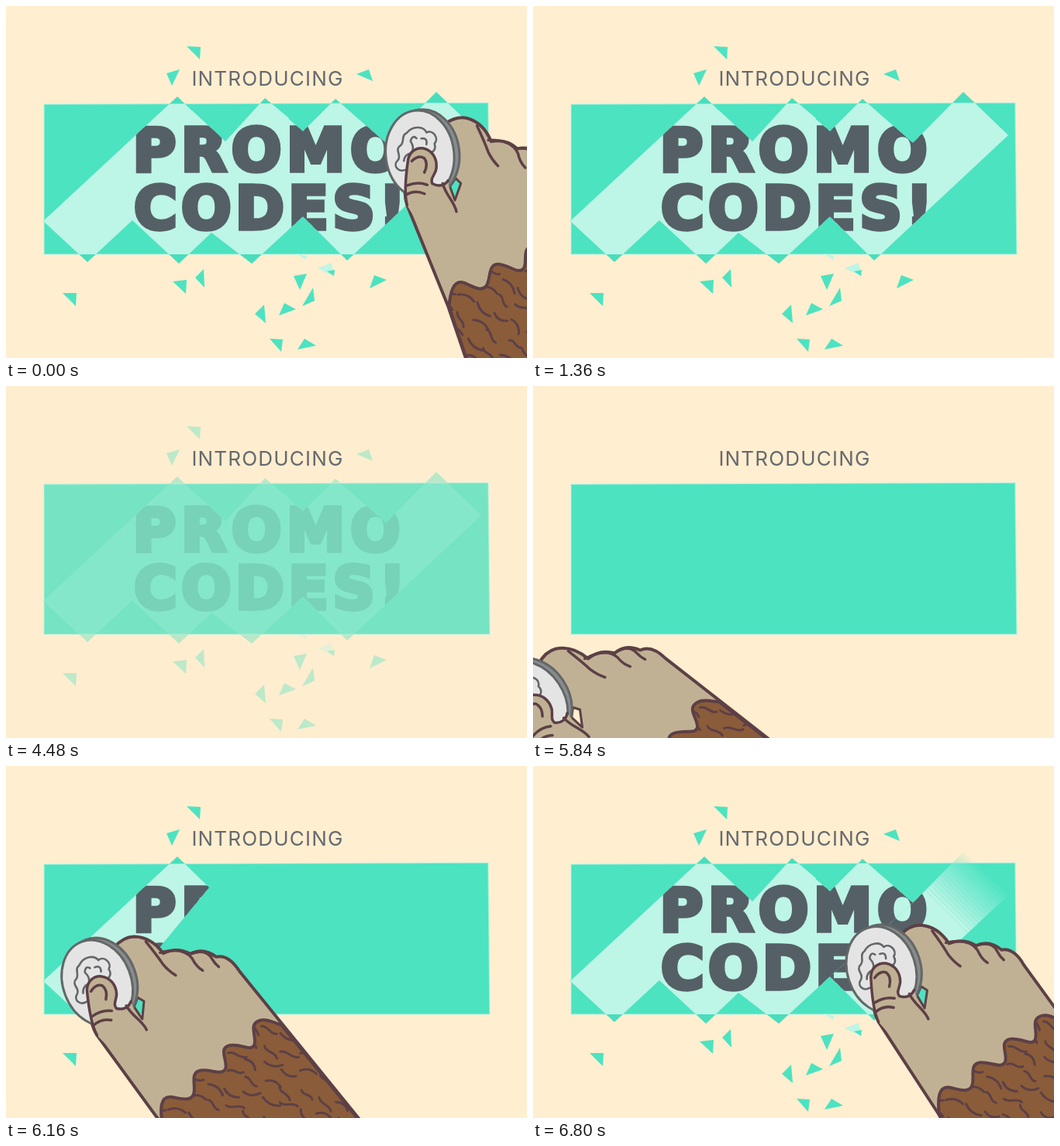
Recreate the animation shown at these times as an HTML page with a canvas. Size 672x455 px, loop 6.88 s.

```html
<!DOCTYPE html>
<html lang="en">
<head>
<meta charset="utf-8">
<title>Promo codes</title>
<style>
html, body { margin: 0; width: 100%; height: 100%; overflow: hidden; background: #ffeecf; }
canvas { display: block; }
</style>
</head>
<body>
<canvas id="stage" width="672" height="455"></canvas>
<script>
const ctx = document.getElementById('stage').getContext('2d');
const LOOP = 6880, STEP = 80;
const BG = '#ffeecf', TEAL = '#4ce3c1', PALE = '#bdf5e6', INK = '#555f66';
const LINE = '#5d4046', SKIN = '#c1b194', FUR = '#8a5c39', RIM = '#636768';

const stage = new Path2D('M0 0H672V455H0Z');
const card = new Path2D('M49 127L622 125L624 321L49 321Z');

// Scratched bands: outline, start time, range of x - y they sweep, loose flakes
const bands = [
  { shape: 'M48 278L221 117L262 157L163 277L105 331Z',
    start: 5920, from: -232, to: 110,
    flakes: 'M233 52L251 53L250 69ZM207 87L224 82L214 103ZM73 371L91 371L90 388Z' },
  { shape: 'M163 277L240 135L283 175L334 119L365 145L265 293L223 333Z',
    start: 6240, from: -116, to: 222,
    flakes: 'M215 356L233 354L232 372ZM255 340L256 364L244 351ZM333 386L335 410L321 398ZM352 400L359 384L374 392ZM340 430L357 431L355 447Z' },
  { shape: 'M265 293L345 129L383 162L425 120L490 177L383 272L317 333Z',
    start: 6480, from: -30, to: 316,
    flakes: 'M371 349L388 346L379 367ZM396 364L398 381L382 388ZM376 444L385 430L400 439ZM452 88L468 82L473 97Z' },
  { shape: 'M383 272L450 142L490 177L555 111L613 167L440 329Z',
    start: 6720, from: 110, to: 446,
    flakes: 'M475 348L491 354L469 365Z' }
];
bands.forEach(b => {
  b.shape = new Path2D(b.shape);
  b.flakes = new Path2D(b.flakes);
});
const paleFlakes = new Path2D('M402 339L420 332L423 349ZM375 320L388 323L387 328Z');

// Hand keys: time, coin centre, turn in degrees
const keys = [
  [5840, -2, 405, -15], [5920, 85, 308, -8], [6000, 160, 228, -3], [6080, 184, 208, -1],
  [6160, 120, 277, -2], [6240, 232, 262, 0], [6320, 292, 200, 2], [6400, 305, 208, 2],
  [6480, 347, 268, 0], [6560, 402, 208, 2], [6640, 432, 186, 4], [6720, 420, 222, 3],
  [6800, 452, 260, 1], [6880, 537, 189, 12], [6960, 594, 152, 15], [7040, 648, 172, 17],
  [7120, 706, 232, 18], [7200, 770, 320, 18]
];

const arm = new Path2D('M334 300C334 322 337 330 342 339L421 456L560 690L850 690L528 262Q515 240 499 243Q483 230 466 238Q449 228 431 236Q416 214 394 213Q380 213 368 226Z');
const gap = new Path2D('M396 292L404 297L401 320L391 304Z');
const knuckles = new Path2D('M409 220Q424 240 430 250Q437 259 446 265M427 235Q457 228 468 244Q473 255 481 260M466 238Q487 231 494 246Q497 252 502 256');
const fur = new Path2D('M422 456C420 438 420 420 435 422C450 425 458 428 463 421C469 411 458 391 474 389C489 388 501 397 506 388C510 379 497 361 512 358C528 356 539 367 544 359C549 349 536 331 553 327C562 325 571 331 580 334L850 690L560 690Z');
const thumb = new Path2D('M336 320C333 310 332 295 331 281C331 269 340 262 350 263C362 265 369 275 369 287C368 296 364 299 368 305C376 307 383 304 387 297L392 310L370 370L342 339Z');
const thumbLine = new Path2D('M342 339C335 325 332 297 331 281C331 269 340 262 350 263C362 265 369 275 369 287C368 296 364 299 368 305C377 308 384 304 387 297M381 302C388 316 401 322 406 334M336 282Q343 272 351 275Q358 281 355 293M337 314Q349 306 362 308M338 326Q348 317 361 320');
const crest = new Path2D('M322 248C328 236 342 235 347 242C354 236 365 246 360 254C365 262 358 269 353 266M322 248C315 252 323 261 317 266C311 273 323 278 318 285C313 293 322 300 330 295M336 252Q330 248 329 257Q337 265 333 272Q325 276 326 284M342 251Q350 248 350 257');

function random(seed) {
  return () => (seed = (seed * 16807) % 2147483647) / 2147483647;
}

function makeHairs() {
  const path = new Path2D(), rnd = random(29);
  for (let i = -2; i < 16; i++) {
    for (let j = -1; j < 10; j++) {
      const across = j * 29 + (i & 1) * 14 + rnd() * 7;
      const along = i * 19 + rnd() * 6;
      const x = 428 + across * 0.85 + along * 0.6;
      const y = 436 - across * 0.54 + along * 0.8;
      const a = 0.1 + rnd() * 0.9, len = 18 + rnd() * 7;
      const bend = rnd() < 0.5 ? -5 : 5, back = rnd() < 0.5 ? bend : -bend;
      const dx = Math.cos(a), dy = Math.sin(a);
      path.moveTo(x, y);
      path.bezierCurveTo(x + dx * len * 0.35 - dy * bend, y + dy * len * 0.35 + dx * bend,
        x + dx * len * 0.65 - dy * back, y + dy * len * 0.65 + dx * back, x + dx * len, y + dy * len);
    }
  }
  return path;
}
const hairs = makeHairs();

function fill(path, color) {
  ctx.fillStyle = color;
  ctx.fill(path);
}

function line(path, color, width) {
  ctx.strokeStyle = color;
  ctx.lineWidth = width;
  ctx.stroke(path);
}

function ellipse(x, y, rx, ry) {
  const path = new Path2D();
  path.ellipse(x, y, rx, ry, -0.33, 0, Math.PI * 2);
  return path;
}
const coinBack = ellipse(350, 269, 45, 57);
const coinFace = ellipse(344.5, 271.5, 44, 57);

function words(text, x, y, spacing) {
  ctx.font = 'bold 76px "DejaVu Sans", sans-serif';
  ctx.letterSpacing = spacing + 'px';
  ctx.lineJoin = 'miter';
  ctx.lineWidth = 5.5;
  ctx.fillStyle = ctx.strokeStyle = INK;
  ctx.fillText(text, x, y);
  ctx.strokeText(text, x, y);
}

function drawBack() {
  fill(stage, BG);
  fill(card, TEAL);
  line(card, 'rgba(189,245,230,.6)', 1.5);
}

function drawTitle() {
  ctx.font = '400 26px Inter, sans-serif';
  ctx.letterSpacing = '1.2px';
  ctx.textAlign = 'center';
  ctx.fillStyle = '#65696e';
  ctx.fillText('INTRODUCING', 337.5, 103);
  ctx.textAlign = 'left';
}

// Strip of the plane where x - y lies between two limits
function clipDiagonal(low, high) {
  const p = new Path2D();
  p.moveTo(high - 500, -500);
  p.lineTo(high + 1000, 1000);
  p.lineTo(low + 1000, 1000);
  p.lineTo(low - 500, -500);
  ctx.clip(p);
}

function reveal(shape, low, high) {
  ctx.save();
  clipDiagonal(low, high);
  ctx.clip(shape);
  fill(stage, '#48debd');
  ctx.clip(card);
  fill(stage, PALE);
  words('PROMO', 163.5, 213.2, 6.5);
  words('CODES!', 165, 288.2, 5.2);
  ctx.restore();
}

// How far a band has been swept, 0 to 1
function sweep(band, t) {
  if (t < 4720) return 1;
  if (t < band.start) return 0;
  return [0.3, 0.85][(t - band.start) / STEP] || 1;
}

// The moving end of a band melts away ahead of the coin
function softEnd(shape, from, to) {
  const step = 6.5;
  for (let a = from; a < to; a += step) {
    ctx.globalAlpha = (to - a) / (to - from);
    reveal(shape, a, a + step);
  }
  ctx.globalAlpha = 1;
}

function drawScratches(t) {
  const done = new Path2D();
  bands.forEach((band, i) => {
    const k = sweep(band, t);
    if (k === 1) done.addPath(band.shape);
    else if (k > 0) {
      const end = band.from + (band.to - band.from) * k;
      reveal(band.shape, -1000, end - 50);
      softEnd(band.shape, end - 50, end + 50);
    }
    if (k > 0.5) fill(band.flakes, TEAL);
    if (i === 2 && k > 0.5) fill(paleFlakes, PALE);
  });
  reveal(done, -1000, 1000);
  if (t < 4720 || t >= 6640) fill(new Path2D('M414 343L424 341L423 349Z'), TEAL);
}

function drawHand(x, y, turn) {
  ctx.save();
  ctx.translate(x, y);
  ctx.rotate(turn * Math.PI / 180);
  ctx.translate(-347, -268);
  ctx.lineCap = ctx.lineJoin = 'round';

  const body = new Path2D(arm);
  body.addPath(gap);
  ctx.fillStyle = SKIN;
  ctx.fill(body, 'evenodd');
  fill(fur, FUR);
  ctx.save();
  ctx.clip(fur);
  line(hairs, LINE, 3);
  ctx.restore();
  line(fur, LINE, 4);
  line(arm, LINE, 4);
  line(gap, LINE, 3);
  line(knuckles, LINE, 3.5);

  fill(coinBack, '#898c8c');
  line(coinBack, RIM, 3);
  fill(coinFace, '#e5e4e5');
  line(coinFace, RIM, 3);
  line(crest, RIM, 2.6);

  fill(thumb, SKIN);
  line(thumbLine, LINE, 3.5);
  ctx.restore();
}

function draw(t) {
  drawBack();
  if (t < 4720 || t >= 5920) drawScratches(t);
  if (t > 4080 && t < 4720) {
    ctx.globalAlpha = (t - 4080) / 640;
    drawBack();
    ctx.globalAlpha = 1;
  }
  drawTitle();
  const at = t < 400 ? t + LOOP : t;
  const key = keys.find(k => k[0] === at);
  if (key) drawHand(key[1], key[2], key[3]);
}

const begin = performance.now();
function tick(now) {
  const t = Math.max(0, now - begin) % LOOP;
  draw(Math.floor(t / STEP) * STEP);
  requestAnimationFrame(tick);
}
draw(0);
requestAnimationFrame(tick);
</script>
</body>
</html>
```
